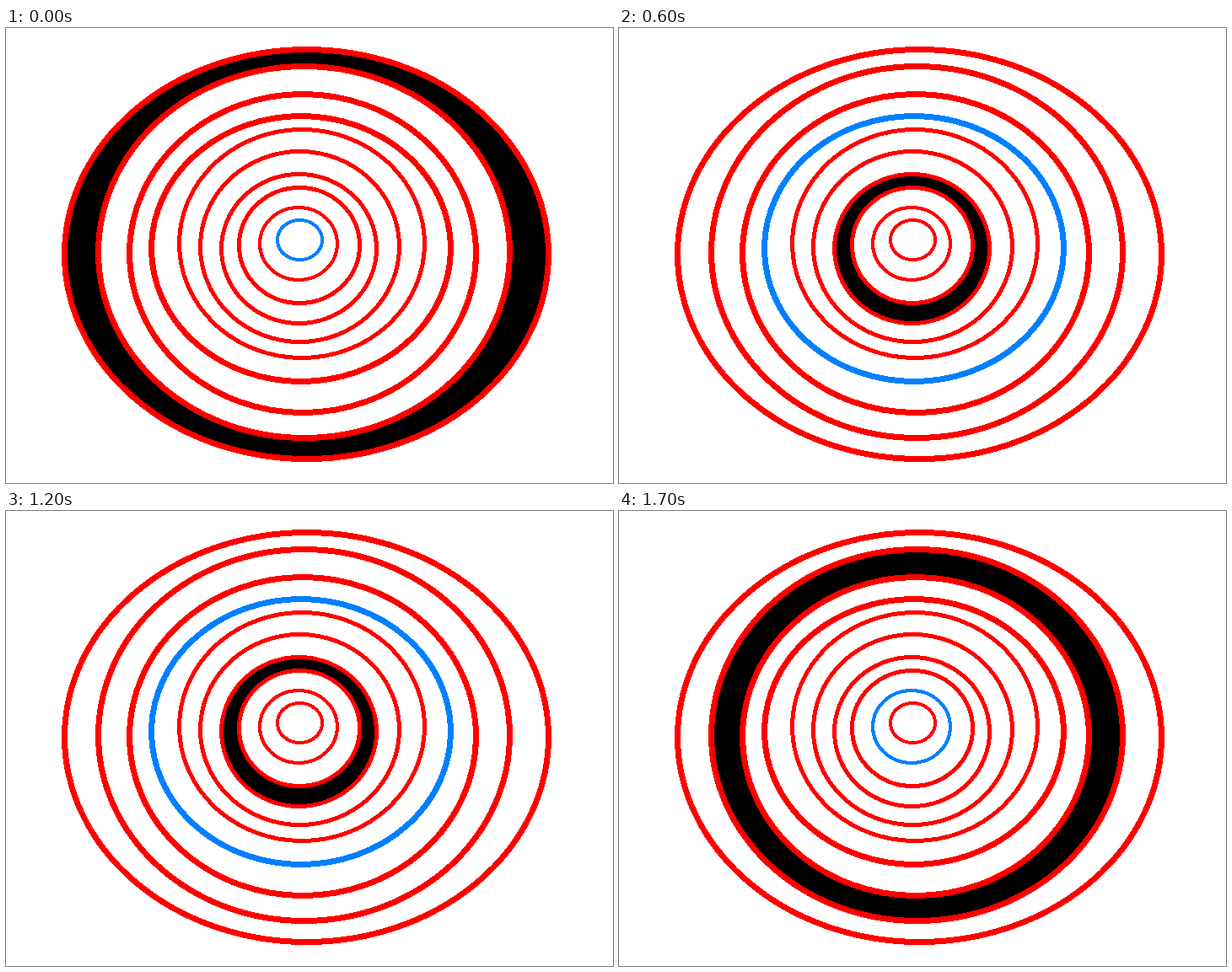
An HTML page that plays this animation: 720x540 px, repeating every 1800 ms.

```html
<!DOCTYPE html>
<html lang="en">
<head>
<meta charset="utf-8">
<title>Rings</title>
<style>
html, body { margin: 0; height: 100%; overflow: hidden; background: #fff; }
svg { display: block; width: 100vw; height: 100vh; }
</style>
</head>
<body>
<svg id="stage" viewBox="0 0 720 540" shape-rendering="crispEdges"></svg>
<script>
const STEP = 100;
const RED = '#ff0000', BLUE = '#0080ff';

// Outer edges (left, top, right, bottom) and line width, largest ring first
const BOXES = [
  [66, 22, 647, 515, 7],
  [106, 42, 601, 490, 7],
  [143, 75, 561, 460, 7],
  [169, 101, 531, 423, 7],
  [203, 118, 499, 394, 5],
  [228, 144, 469, 375, 5],
  [253, 171, 442, 353, 5],
  [274, 187, 422, 329, 5],
  [299, 211, 395, 301, 4],
  [320, 226, 377, 277, 4]
];
const LAST = BOXES.length - 1;
const stage = document.getElementById('stage');

const rings = BOXES.map(([left, top, right, bottom, width]) => {
  const ring = document.createElementNS('http://www.w3.org/2000/svg', 'ellipse');
  const attrs = {
    cx: (left + right) / 2,
    cy: (top + bottom) / 2,
    rx: (right - left - width) / 2,
    ry: (bottom - top - width) / 2,
    'stroke-width': width
  };
  for (const name in attrs) ring.setAttribute(name, attrs[name]);
  return stage.appendChild(ring);
});

// The black band runs inwards and back; the blue line runs the opposite way
function draw(time) {
  const step = Math.floor(time / STEP) % (2 * LAST);
  const band = LAST - Math.abs(LAST - step);
  rings.forEach((ring, i) => {
    ring.setAttribute('fill', i === band ? '#000' : '#fff');
    ring.setAttribute('stroke', i === LAST - band ? BLUE : RED);
  });
}

const start = performance.now();
function tick() {
  draw(performance.now() - start);
  requestAnimationFrame(tick);
}
tick();
</script>
</body>
</html>
```
